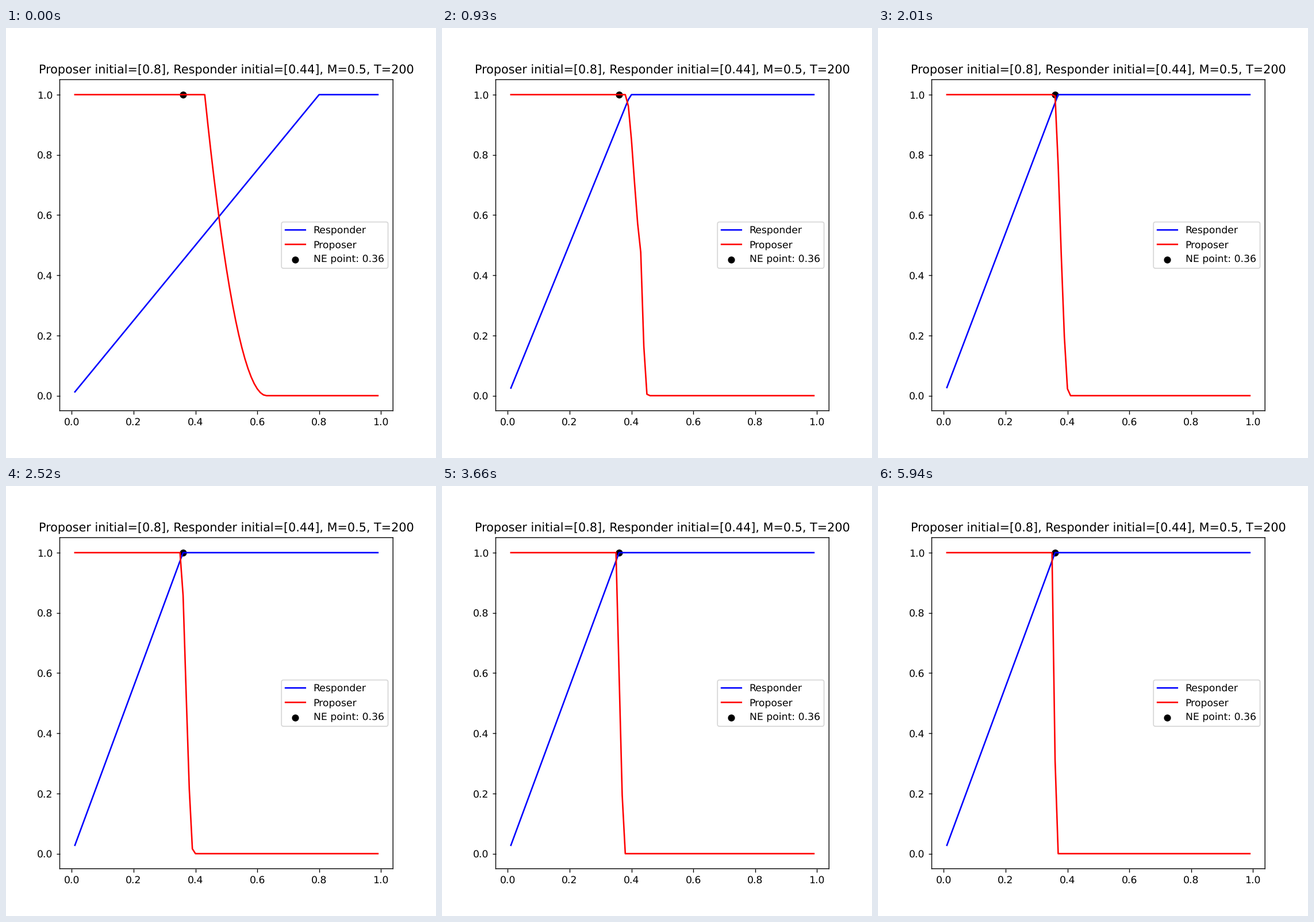
Animation of 748 by 748 pixels, one loop 5970 ms. Source, as a matplotlib script:

```python
import numpy as np
import matplotlib.pyplot as plt
from matplotlib.animation import FuncAnimation

SIZE, INCHES = 748, 6
ROUNDS, INTERVAL = 199, 30
RATE = 0.5
OFFER0, THRESHOLD0 = 0.8, 0.44

k = np.arange(1, 100)
x = k / 100


def project(v):
    """Euclidean projection onto the probability simplex."""
    u = np.sort(v)[::-1]
    shift = (np.cumsum(u) - 1) / np.arange(1, len(u) + 1)
    return np.maximum(v - shift[np.nonzero(u > shift)[0][-1]], 0)


def pure(value):
    return (k == round(value * 100)).astype(float)


def play():
    """Regularised-leader dynamics of the ultimatum game."""
    offers, thresholds = pure(OFFER0), pure(THRESHOLD0)
    gain_p, gain_r = np.zeros(len(x)), np.zeros(len(x))
    history = []
    for _ in range(ROUNDS):
        gain_p += (1 - x) * np.cumsum(thresholds)
        gain_r += np.cumsum((x * offers)[::-1])[::-1]
        offers, thresholds = project(RATE * gain_p), project(RATE * gain_r)
        history.append((np.cumsum(thresholds), 1 - np.cumsum(offers)))
    return history


history = play()

# Smooth sub-pixel placement of lines and glyphs.
plt.rcParams.update({"font.family": "DejaVu Sans", "path.snap": False,
                     "text.hinting": "none"})
fig, ax = plt.subplots(figsize=(INCHES, INCHES), dpi=SIZE / INCHES)
ax.set_title(f"Proposer initial=[{OFFER0}], Responder initial=[{THRESHOLD0}], "
             f"M={RATE}, T=200")
ax.set_xlim(-0.039, 1.039)
ax.set_ylim(-0.05, 1.05)

accept, = ax.plot(x, history[0][0], color="blue", label="Responder")
demand, = ax.plot(x, history[0][1], color="red", label="Proposer")
ax.scatter([0.36], [1], color="black", label="NE point: 0.36")
ax.legend(loc="center right")


def update(i):
    cdf, tail = history[i]
    accept.set_ydata(cdf)
    demand.set_ydata(tail)
    return accept, demand


anim = FuncAnimation(fig, update, frames=ROUNDS, interval=INTERVAL,
                     repeat=True, repeat_delay=0)
plt.show()
```
